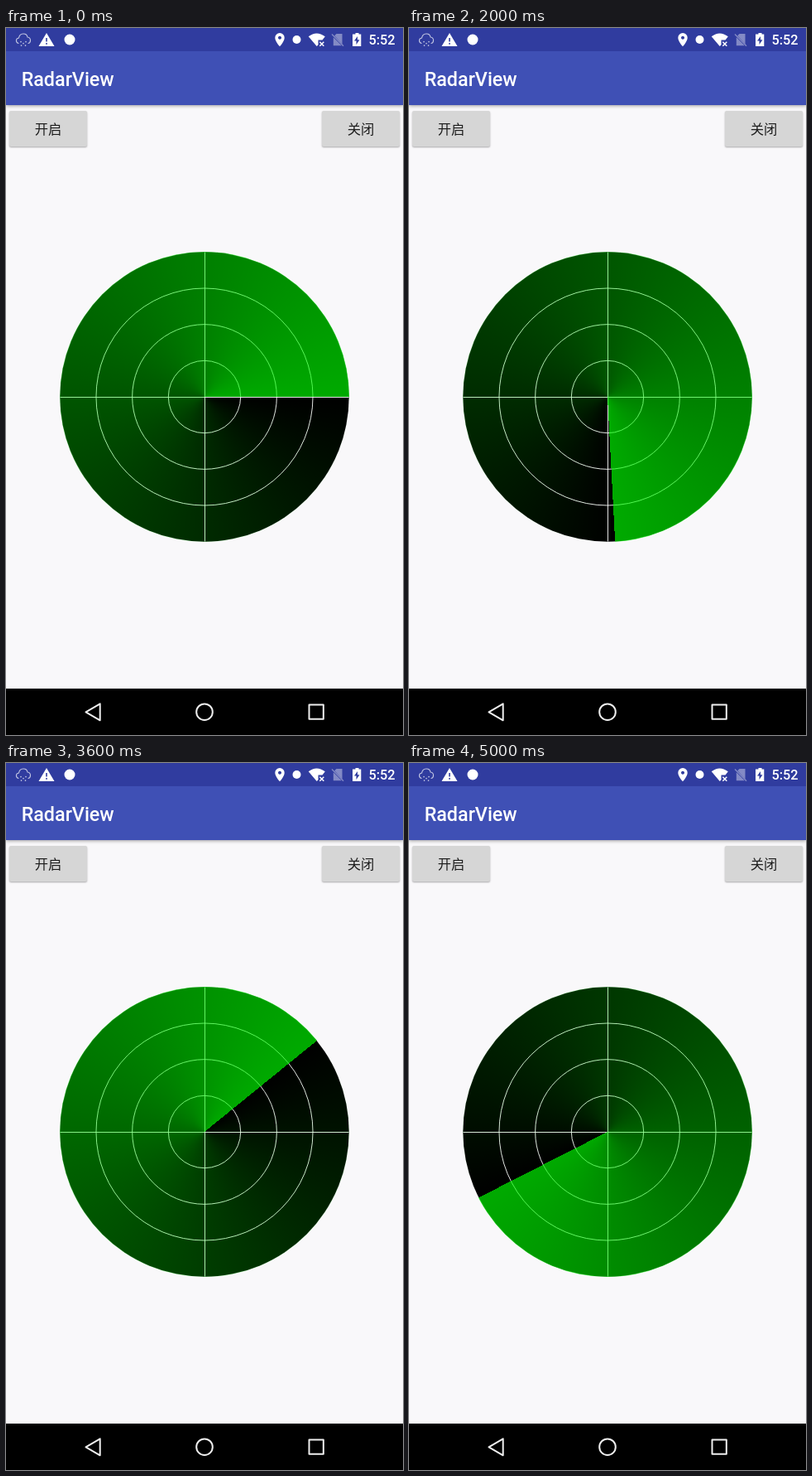
Animation, 480 px wide and 853 px high, one loop 5.2 s. Source, as an HTML page:

```html
<!DOCTYPE html>
<html lang="zh">
<head>
<meta charset="utf-8">
<title>RadarView</title>
<style>
  html, body { margin: 0; width: 100%; height: 100%; overflow: hidden; background: #f9f8fa; }
  #stage { position: absolute; left: 0; top: 0; width: 480px; height: 853px; overflow: hidden; }
  #stage > * { position: absolute; }
  .status { left: 0; top: 0; width: 480px; height: 28px; background: #303c9f; }
  .toolbar { left: 0; top: 28px; width: 480px; height: 65px; background: #3f50b5; box-shadow: 0 1px 4px rgba(0, 0, 0, .38); }
  .nav { left: 0; top: 797px; width: 480px; height: 56px; background: #000; }
  .button {
    top: 100px; width: 94px; height: 43px; border-radius: 2px; background: #d6d6d6;
    box-shadow: 0 1px 2px rgba(0, 0, 0, .32);
    font: 500 16.3px/43px "Noto Sans CJK SC", "Noto Sans CJK", sans-serif;
    font-weight: 400; color: #1c1c1c; text-align: center;
  }
  #sweep { left: 65.3px; top: 270.3px; width: 349.4px; height: 349.4px; border-radius: 50%; }
  svg { left: 0; top: 0; }
  text { font-family: Roboto, sans-serif; font-weight: 500; fill: #fff; }
</style>
</head>
<body>
<div id="stage">
  <div class="toolbar"></div>
  <div class="status"></div>
  <div class="button" style="left:4px">开启</div>
  <div class="button" style="left:382px">关闭</div>
  <div class="nav"></div>

  <svg width="480" height="853">
    <circle cx="240" cy="445" r="174.7"/>
    <g id="grid" fill="none" stroke="#fff" stroke-width=".9">
      <path d="M65.5 445.5H414.5M240.5 270.5V619.5" stroke-width="1" stroke-opacity=".9"/>
    </g>
  </svg>
  <div id="sweep"></div>

  <svg width="480" height="853">
    <text x="18.7" y="69.7" font-size="23.3">RadarView</text>
    <text x="438.5" y="20" font-size="16.3">5:52</text>

    <!-- notifications -->
    <g fill="none" stroke="#fff" stroke-opacity=".7" stroke-width="1.1" stroke-linecap="round">
      <path d="M15 18.5C11.500 17.500 11.500 12.500 15.500 12C16.500 5.500 25 5.500 26 11C30.500 11.500 30.500 17.500 27 18.500"/>
      <path d="M18 16.500v.1M21 18.500v.1M24 16.500v.1M18.500 21v.1M23.500 21v.1" stroke-width="1.7"/>
    </g>
    <path fill="#fff" fill-rule="evenodd" d="M49 6L58.500 22H39.500ZM48.200 12V16.500H49.800V12ZM48.200 18V19.700H49.800V18Z"/>
    <circle cx="77" cy="14" r="6.500" fill="#fff"/>

    <!-- system icons -->
    <path fill="#fff" fill-rule="evenodd" d="M331 6a5.700 5.700 0 0 1 5.700 5.700C336.700 16 331 22.300 331 22.300S325.300 16 325.300 11.700A5.700 5.700 0 0 1 331 6ZM331 9.700a2 2 0 1 0 .01 0Z"/>
    <circle cx="351.500" cy="14" r="5" fill="#fff"/>
    <path fill="#fff" d="M365.700 10.300Q375.500 2.700 385.800 10.300L382.500 14.500H377.500V20.200L375.700 22Z"/>
    <path stroke="#fff" stroke-width="1.500" d="M379.300 16.700L384.300 21.700M384.300 16.700L379.300 21.700"/>
    <g opacity=".4">
      <path fill="#fff" d="M399.500 7H406.500V19.500L397.200 9.300ZM395.800 11.200L405.800 21.300H395.800Z"/>
      <path stroke="#fff" stroke-width="1.300" d="M394 7.500L408 21.800"/>
    </g>
    <path fill="#fff" fill-rule="evenodd" d="M422.500 6H426.500V7.500H429.300V22H419V7.500H422.500ZM425 10L421 15.500H423.500V20L427.500 14.200H425Z"/>

    <!-- navigation keys -->
    <g fill="none" stroke="#eee" stroke-width="2" stroke-linejoin="round">
      <path d="M96.500 825.300L113.700 815.300V835.300Z"/>
      <circle cx="240" cy="825.200" r="9.800"/>
      <rect x="366.500" y="816.500" width="17.300" height="17.300"/>
    </g>
  </svg>
</div>
<script>
  const LOOP = 5200, STEP = 200;
  // time in ms, sweep angle in degrees clockwise from the right
  const TURN = [[0, 0], [1400, 0], [2000, 87], [2600, 174], [3600, 321], [4400, 438], [5000, 513]];
  const sweep = document.getElementById('sweep');
  const grid = document.getElementById('grid');

  for (let i = 1; i <= 3; i++) {
    const ring = document.createElementNS(grid.namespaceURI, 'circle');
    ring.setAttribute('cx', 240);
    ring.setAttribute('cy', 445);
    ring.setAttribute('r', 174.7 * i / 4);
    grid.append(ring);
  }

  function angleAt(time) {
    const next = TURN.findIndex(([t]) => t > time);
    if (next < 0) return TURN[TURN.length - 1][1];
    const [t0, a0] = TURN[next - 1], [t1, a1] = TURN[next];
    return a0 + (a1 - a0) * (time - t0) / (t1 - t0);
  }

  let shown;
  function draw() {
    const time = Math.floor(performance.now() % LOOP / STEP) * STEP;
    if (time !== shown) {
      shown = time;
      sweep.style.background =
        `conic-gradient(from ${90 + angleAt(time)}deg, rgba(0, 255, 0, 0), rgba(0, 255, 0, .667))`;
    }
    requestAnimationFrame(draw);
  }
  draw();
</script>
</body>
</html>
```
